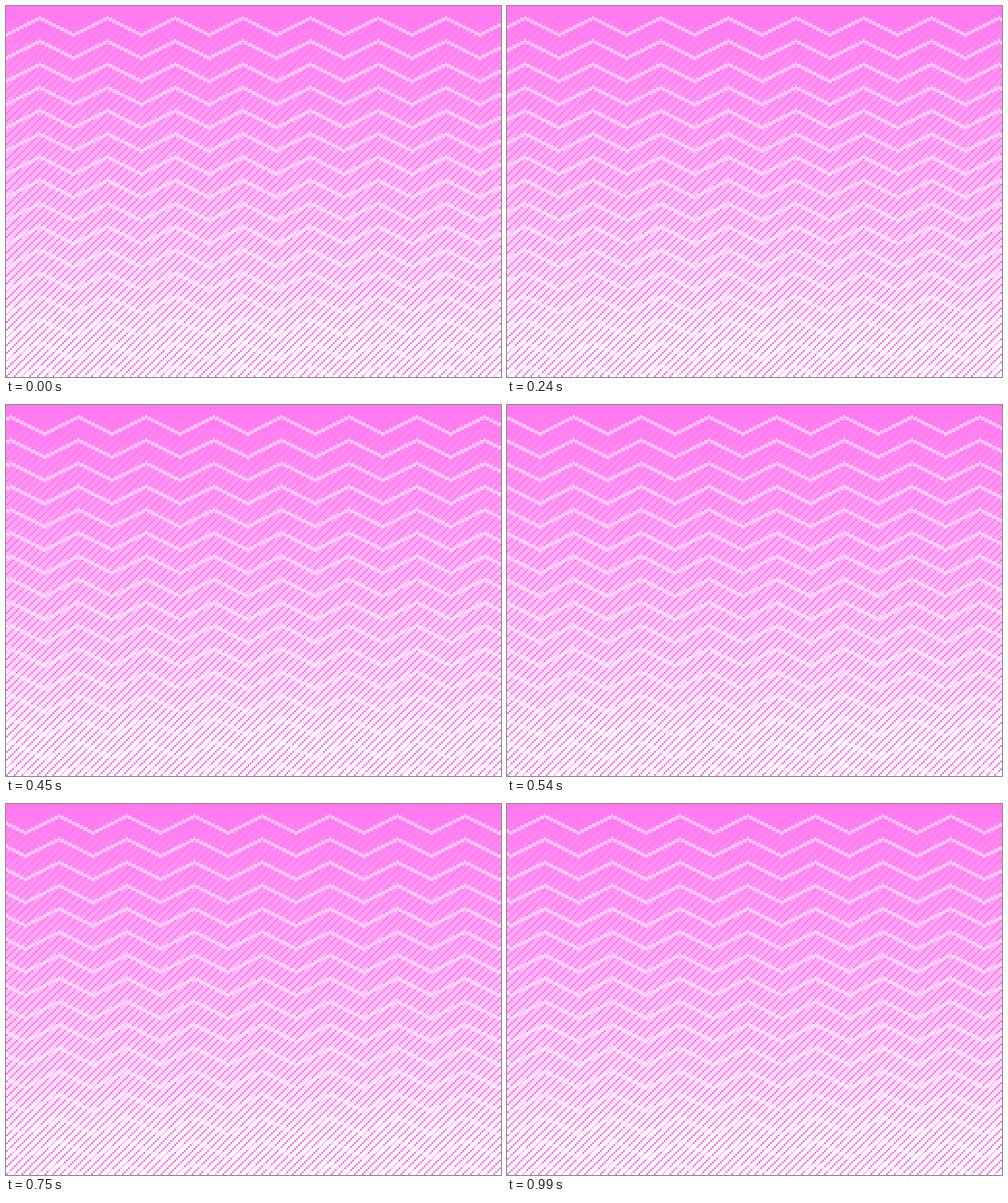
These frames come from a looping animation (512 by 384 pixels, 1060 ms). An HTML page without scripts:

```html
<!DOCTYPE html>
<html lang="en">
<head>
<meta charset="utf-8">
<title>Zigzag drift</title>
<style>
  html, body {
    margin: 0;
    width: 100%;
    height: 100%;
    overflow: hidden;
    background: #fff;
  }

  svg {
    display: block;
    width: 512px;
    height: 384px;
  }

  /* One pixel-art dot (2px) per step; the last pose rests until the loop restarts. */
  .drift {
    animation: drift 1060ms infinite;
  }

  @keyframes drift {
    0% {
      transform: translateX(0);
      animation-timing-function: steps(34, jump-none);
    }
    96.2264%, 100% {
      transform: translateX(-66px);
    }
  }
</style>
</head>
<body>
<svg viewBox="0 0 512 384" shape-rendering="crispEdges">
  <defs>
    <linearGradient id="sky" x2="0" y2="384" gradientUnits="userSpaceOnUse">
      <stop offset="0" stop-color="#ff78f0"/>
      <stop offset=".78" stop-color="#ffe2fc"/>
      <stop offset=".9" stop-color="#fff"/>
    </linearGradient>

    <pattern id="hatch" width="8" height="8" patternUnits="userSpaceOnUse">
      <path fill="#ff78f0" d="M6 0h2v2h-2zM4 2h2v2h-2zM2 4h2v2h-2zM0 6h2v2h-2z"/>
    </pattern>

    <pattern id="zigzag" y="10" width="70" height="24" patternUnits="userSpaceOnUse">
      <path fill="#fff" fill-opacity=".5" d="M0 18h2
        v-2h4v-2h4v-2h4v-2h4v-2h4v-2h4v-2h4v-2h4 v-2h2
        v2h4v2h4v2h4v2h4v2h4v2h4v2h4v2h4 v2h2 v4h-2
        v-2h-4v-2h-4v-2h-4v-2h-4v-2h-4v-2h-4v-2h-4v-2h-4 v-2h-2
        v2h-4v2h-4v2h-4v2h-4v2h-4v2h-4v2h-4v2h-4 v2h-2z"/>
    </pattern>
  </defs>

  <rect width="512" height="384" fill="url(#sky)"/>
  <rect width="512" height="384" fill="url(#hatch)"/>
  <rect class="drift" y="10" width="580" height="374" fill="url(#zigzag)"/>
</svg>
</body>
</html>
```
